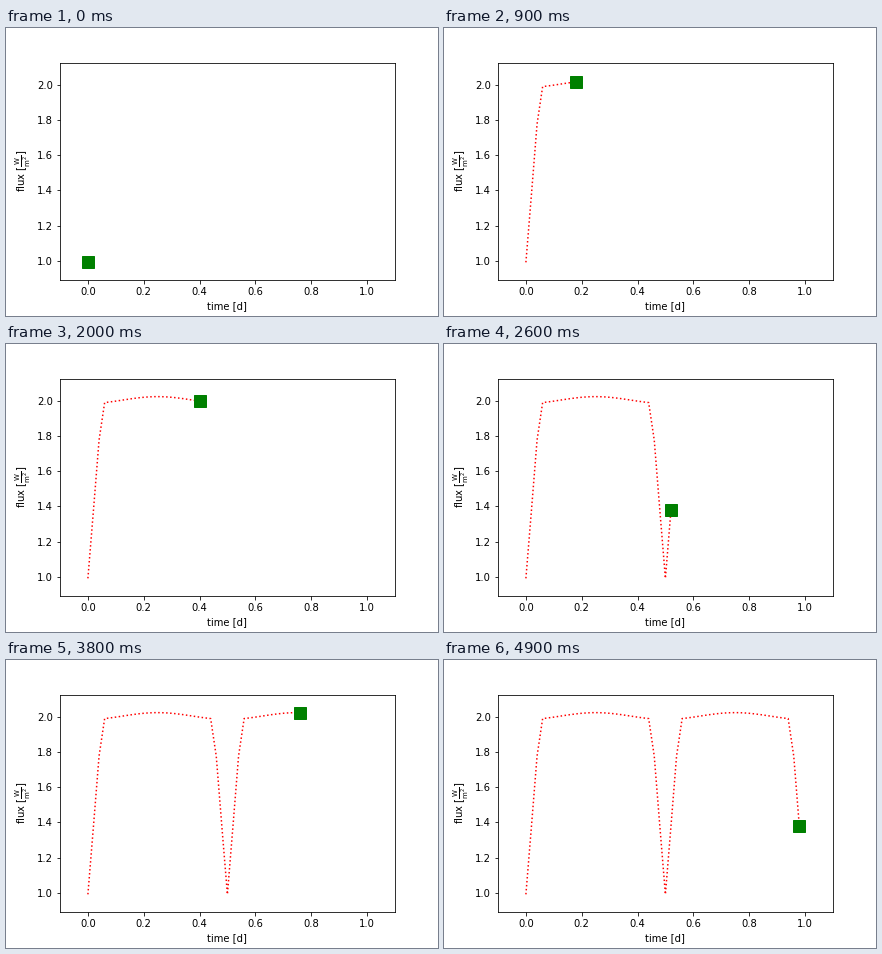
A matplotlib script that plays this animation: 432x288 px, repeating every 5 s.

```python
import numpy as np
import matplotlib.pyplot as plt
from matplotlib.animation import FuncAnimation

FRAMES = 50
INTERVAL = 100
PERIOD = 0.5


def flux(t):
    """Out-of-eclipse modulation dimmed by a partial eclipse every PERIOD."""
    s = np.abs(t - PERIOD * np.round(t / PERIOD))
    blocked = np.clip(0.5 - 9.66 * s - 5 * s**2, 0, None)
    return (2.004 - 0.0195 * np.cos(2 * np.pi * t / PERIOD)) * (1 - blocked)


time = np.arange(FRAMES) * 0.02
values = flux(time)

plt.rcParams["font.family"] = "DejaVu Sans"
fig = plt.figure(figsize=(6, 4), dpi=72, facecolor="white")
ax = fig.add_axes([0.125, 0.125, 0.775, 0.755])
ax.set_xlim(-0.1, 1.1)
ax.set_ylim(0.892, 2.126)
ax.set_xticks(np.arange(0, 1.1, 0.2))
ax.set_yticks(np.arange(1, 2.1, 0.2))
ax.set_xlabel("time [d]")
ax.set_ylabel(r"flux [$\mathrm{\frac{W}{m^2}}$]")

trail, = ax.plot([], [], "r:", lw=1.5)
marker, = ax.plot([], [], "gs", ms=12)


def update(i):
    trail.set_data(time[:i + 1], values[:i + 1])
    marker.set_data(time[i:i + 1], values[i:i + 1])
    return trail, marker


anim = FuncAnimation(fig, update, frames=FRAMES, interval=INTERVAL,
                     repeat=True, repeat_delay=0)
plt.show()
```
